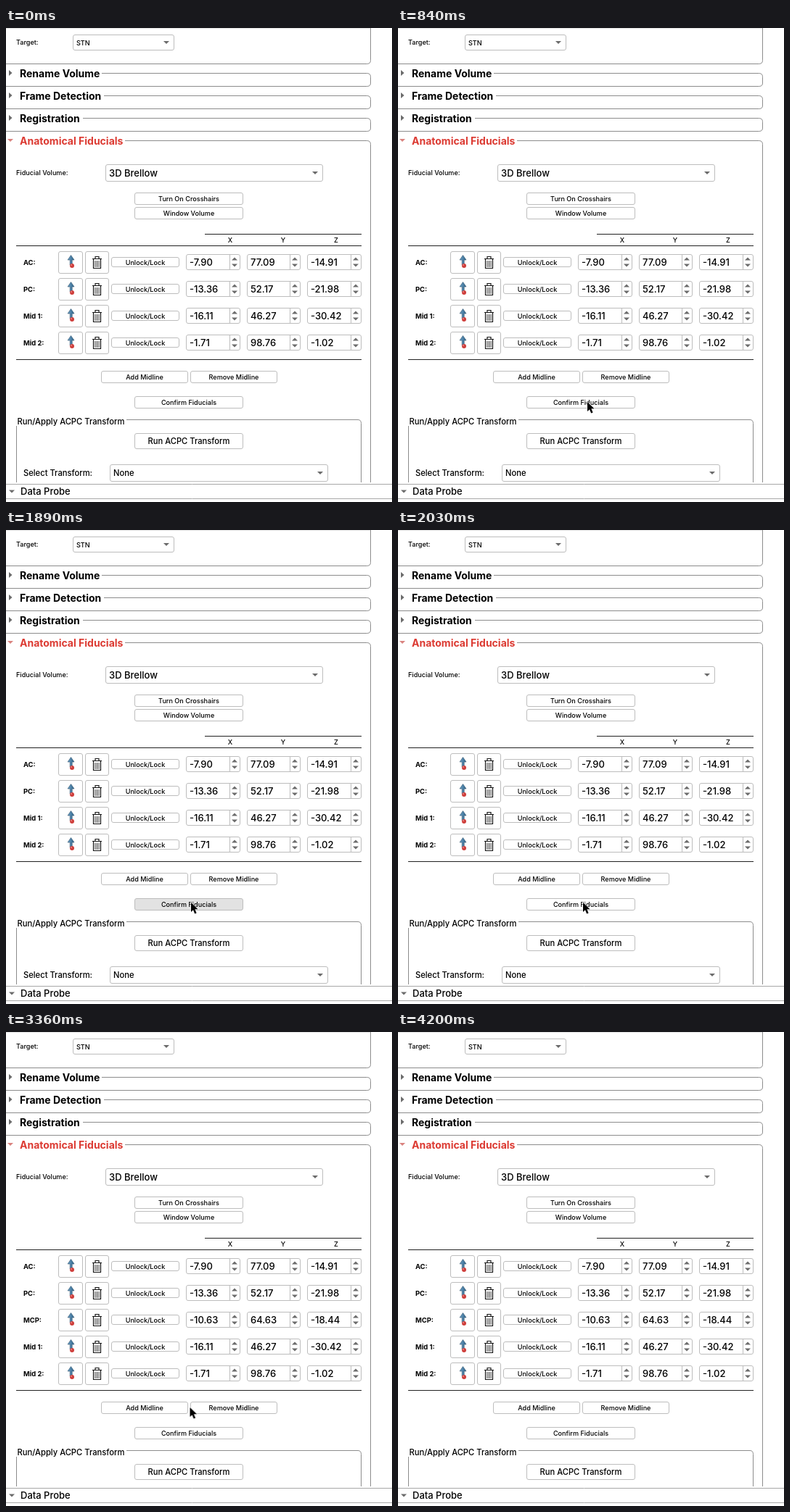
An HTML page that plays this animation: 532 px wide and 654 px high, repeating every 4480 ms.

```html
<!DOCTYPE html>
<html lang="en">
<head>
<meta charset="utf-8">
<title>Anatomical Fiducials</title>
<style>
  html, body { margin: 0; width: 100%; height: 100%; overflow: hidden; background: #fff; }
  svg { display: block; width: 532px; height: 654px; }
  text { fill: #000; }
  .small { font: 500 9.1px Inter, sans-serif; }
  .label { font: 700 9.4px Inter, sans-serif; }
  .mid { font: 500 11.2px Inter, sans-serif; }
  .value { font: 500 13px Inter, sans-serif; }
  .head { font: 700 14px Inter, sans-serif; }
  .box { fill: #fff; stroke: #bdbdbd; }
  .frame { fill: none; stroke: #8c8c8c; }
  .rule { fill: none; stroke: #222; }
  .arrow { fill: #6b6b6b; }
</style>
</head>
<body>
<svg id="stage" viewBox="0 0 532 654">
  <defs>
    <linearGradient id="blue"><stop stop-color="#6fa3c8"/><stop offset="1" stop-color="#2d6288"/></linearGradient>
    <g id="place">
      <path d="M-.5-9.5 4-3H1.2V4H-1.8V-3H-5Z" fill="url(#blue)" stroke="#34566f" stroke-width=".6"/>
      <circle cx="1" cy="5" r="3" fill="#cf3f3c"/>
      <circle cx="0" cy="4" r="1" fill="#e98783"/>
    </g>
    <g id="trash" fill="none" stroke="#161616">
      <path d="M-6.5-4.5H6.5M-2.5-5V-7.5H2.5V-5" stroke-width="1.2"/>
      <path d="M-5-4V8.5H5V-4" stroke-width="1.2"/>
      <path d="M-2.5-2V7M0-2V7M2.5-2V7" stroke-width=".9"/>
    </g>
  </defs>
</svg>
<script>
const LOOP = 4480, STEP = 70, SHIFT = 37;
const stage = document.getElementById('stage');

function add(parent, tag, attrs = {}, content = '') {
  const el = document.createElementNS('http://www.w3.org/2000/svg', tag);
  for (const key in attrs) el.setAttribute(key, attrs[key]);
  el.textContent = content;
  return parent.appendChild(el);
}
const group = parent => add(parent, 'g');
const path = (parent, d, cls) => add(parent, 'path', { d, class: cls });
const text = (parent, x, y, str, cls = 'small', anchor = 'start') =>
  add(parent, 'text', { x, y, class: cls, 'text-anchor': anchor }, str);
const box = (parent, x, y, w, h, r = 2.5) =>
  add(parent, 'rect', { x: x + .5, y: y + .5, width: w - 1, height: h - 1, rx: r, class: 'box' });
const tri = (parent, x, y, w, h) =>
  path(parent, `M${x - w} ${y - h / 2}H${x + w}L${x} ${y + h / 2}Z`, 'arrow');

function button(parent, x, y, w, h, str, cls = 'small') {
  const rect = box(parent, x, y, w, h);
  text(parent, x + w / 2, y + h / 2 + (cls === 'mid' ? 4 : 3.5), str, cls, 'middle');
  return rect;
}

function combo(parent, x, y, w, h, str, cls) {
  box(parent, x, y, w, h);
  text(parent, x + 5, y + h / 2 + (cls === 'value' ? 5 : 3.8), str, cls);
  tri(parent, x + w - 11, y + h / 2, 4, 4);
}

function section(y, str, lineX) {
  path(stage, `M${lineX} ${y - .5}H497.5Q502.5 ${y - .5} 502.5 ${y + 4.5}V${y + 13}Q502.5 ${y + 17.5} 497.5 ${y + 17.5}H0`, 'frame');
  path(stage, `M4 ${y - 5}L8.5 ${y - 1}L4 ${y + 3}Z`, 'arrow');
  text(stage, 19, y + 5, str, 'head');
}

function spin(parent, x, right, y, str) {
  box(parent, x, y - 11, right - x, 22);
  path(parent, `M${right - 14.5} ${y - 10}V${y + 10}`, 'box');
  tri(parent, right - 8, y - 4.5, 4, -4);
  tri(parent, right - 8, y + 4.5, 4, 4);
  text(parent, x + 5, y + 5, str, 'value');
}

function row(parent, i, name, values) {
  const y = 323 + SHIFT * i, g = group(parent);
  text(g, 24, y + 4, name + ':', 'label');
  ['place', 'trash'].forEach((icon, k) => {
    box(g, 72 + 37 * k, y - 15, 34 - k, 31);
    add(g, 'use', { href: '#' + icon, x: 90 + 35.5 * k, y });
  });
  button(g, 145, y - 7, 94, 14, 'Unlock/Lock');
  values.forEach((v, k) => spin(g, [248, 332, 415][k], [323, 406, 490][k], y, v));
  return g;
}

// Fixed upper part
path(stage, 'M502.5 0V44.5Q502.5 49.5 497.5 49.5H0', 'frame');
path(stage, 'M0 .5H502', 'box').style.stroke = '#e4e4e4';
text(stage, 14, 23, 'Target:');
combo(stage, 92, 9, 140, 22, 'STN', 'small');
section(63, 'Rename Volume', 132);
section(94, 'Frame Detection', 135);
section(125, 'Registration', 106);
path(stage, 'M164 155.5H497.5Q502.5 155.5 502.5 160.5V628', 'frame');
tri(stage, 6, 155, 4, 4).style.fill = '#d9837f';
text(stage, 19, 161, 'Anatomical Fiducials', 'head').style.fill = '#dc3b33';
text(stage, 14, 203, 'Fiducial Volume:');
combo(stage, 137, 188, 300, 24, '3D Brellow', 'value');
button(stage, 177, 227, 150, 17, 'Turn On Crosshairs');
button(stage, 177, 247, 150, 17, 'Window Volume');
path(stage, 'M274 284.5H490M14 300.5H490', 'rule');
['X', 'Y', 'Z'].forEach((c, k) => text(stage, 309 + 73 * k, 296, c, 'small', 'middle'));

row(stage, 0, 'AC', ['-7.90', '77.09', '-14.91']);
row(stage, 1, 'PC', ['-13.36', '52.17', '-21.98']);
const mcp = row(stage, 2, 'MCP', ['-10.63', '64.63', '-18.44']);

// Everything that slides down when the new row appears
const lower = group(stage);
row(lower, 2, 'Mid 1', ['-16.11', '46.27', '-30.42']);
row(lower, 3, 'Mid 2', ['-1.71', '98.76', '-1.02']);
path(lower, 'M14 457.5H490', 'rule');
button(lower, 131, 473, 120, 17, 'Add Midline');
button(lower, 254, 473, 120, 17, 'Remove Midline');
const confirmBox = button(lower, 177, 508, 150, 17, 'Confirm Fiducials');
path(lower, 'M166 540.5H485Q489.5 540.5 489.5 545.5V654M14.5 549V654', 'frame');
text(lower, 15.5, 547, 'Run/Apply ACPC Transform', 'mid');
button(lower, 177, 559, 150, 22, 'Run ACPC Transform', 'mid');
text(lower, 24, 618, 'Select Transform:', 'mid');
combo(lower, 143, 602, 301, 24, 'None', 'mid');

// Footer bar
add(stage, 'rect', { y: 627, width: 532, height: 27, fill: '#fff' });
path(stage, 'M0 629.5H532M0 649.5H532', 'box').style.stroke = '#a8a8a8';
tri(stage, 8, 639.5, 4, 4);
text(stage, 20, 644, 'Data Probe', 'value');

const cursor = add(stage, 'path', {
  d: 'M0 0V13L3 10.2L5.2 15.4L7.6 14.4L5.4 9.3H9.5Z',
  fill: '#000', stroke: '#fff', 'stroke-width': 1.2, 'paint-order': 'stroke'
});

// keys: [time, style]; each stretch either holds or moves in even ticks
function play(el, keys, moves = false) {
  keys.push([LOOP, keys[keys.length - 1][1]]);
  const frames = keys.map(([t, style], i) => {
    const next = keys[i + 1];
    const ticks = moves && next ? Math.max(1, Math.round((next[0] - t) / STEP)) : 1;
    return { ...style, offset: t / LOOP, easing: `steps(${ticks}, end)` };
  });
  el.animate(frames, { duration: LOOP, iterations: Infinity }).startTime = 0;
}

const at = (x, y) => ({ transform: `translate(${x}px, ${y}px)` });
const route = [
  [0, 330, 670], [70, 326, 646], [210, 310, 592], [350, 293, 546], [490, 282.5, 525],
  [560, 277, 522], [840, 261, 516], [1120, 254, 513.5], [1260, 255, 514], [3220, 254, 514],
  [3290, 254, 514], [3360, 253.5, 518], [3640, 257.5, 591], [3850, 261, 632],
  [4130, 264, 650], [4200, 265, 670]
];
// The pointer rests between its two small nudges
const rest = route.findIndex(([t]) => t === 3220);
route.splice(rest, 0, [3150, 255, 514]);
play(cursor, route.map(([t, x, y]) => [t, at(x, y)]), true);
play(lower, [[0, at(0, 0)], [2730, at(0, SHIFT)]]);
play(mcp, [[0, { opacity: 0 }], [2730, { opacity: 1 }]]);
play(confirmBox, [[0, { fill: '#fff' }], [1890, { fill: '#e2e2e2' }], [2030, { fill: '#fff' }]]);
</script>
</body>
</html>
```
